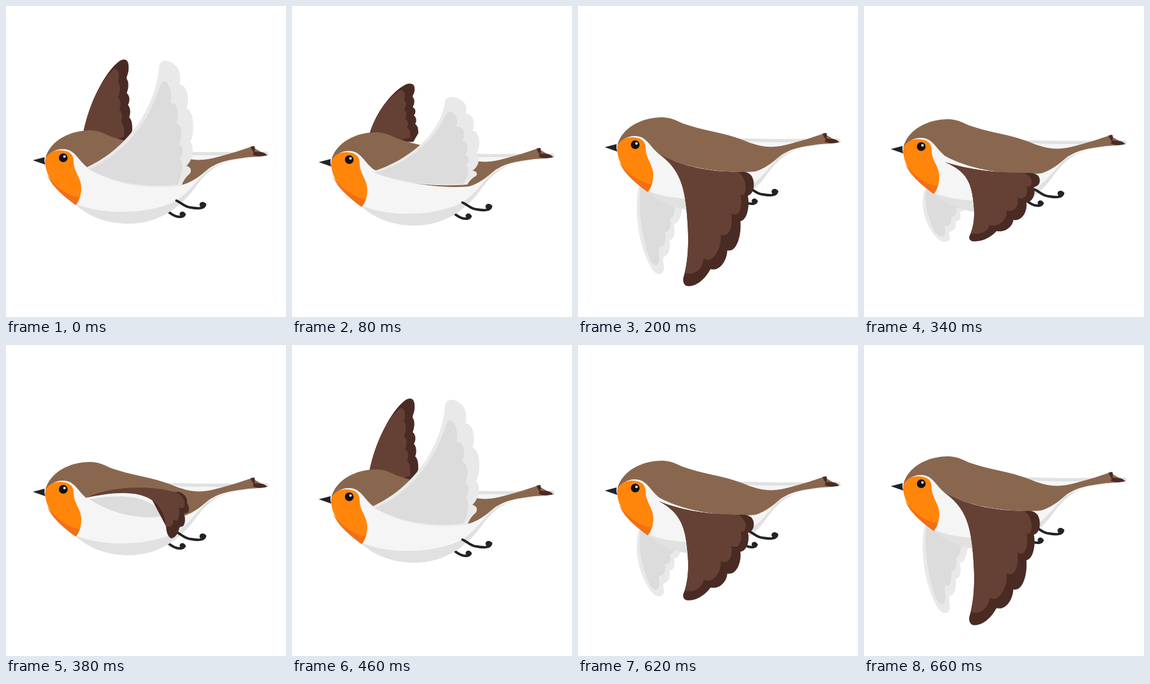
An HTML page that plays this animation: 450x500 px, repeating every 700 ms.

```html
<!DOCTYPE html>
<html lang="en">
<head>
<meta charset="utf-8">
<title>Flying robin</title>
<style>
  html, body { margin: 0; width: 100%; height: 100%; overflow: hidden; background: #fff; }
  svg { display: block; width: 450px; height: 500px; }
  .back { fill: #89674f; }
  .brown { fill: #654135; }
  .dark { fill: #4a2b24; }
  .pale { fill: #e9e9e9; }
  .grey { fill: #dcdcdc; }
  .white { fill: #f5f5f5; }
  .ink { fill: #222327; }
  .leg { fill: none; stroke: #222327; stroke-width: 4; stroke-linecap: round; }
</style>
</head>
<body>
<svg viewBox="0 0 450 500">
  <g id="bird">
    <!-- far wing -->
    <g data-pose="up" data-pivot="205">
      <path class="dark" d="M124 205C133 158 158 106 183 88C192 83 198 87 197 101C197 109 193 114 194 117C198 122 197 133 194 140C200 145 199 154 196 159C201 165 200 174 198 179C203 184 203 192 203 200L195 220H140Z"/>
      <path class="brown" d="M124 205C133 158 153 119 173 102C180 99 184 110 180 123C186 130 182 141 180 147C186 152 184 162 182 167C188 173 187 181 185 187C190 191 190 197 190 210L160 220Z"/>
    </g>
    <g data-pose="down" data-pivot="315">
      <g transform="translate(0 21)">
        <path class="pale" d="M98 287C90 325 95 380 117 420C124 433 134 435 138 424C139 416 135 409 138 403C147 402 149 385 147 376C155 377 157 361 154 350C162 351 167 336 169 310L130 285Z"/>
        <path class="grey" d="M101 290C95 325 104 378 116 408C122 420 130 420 131 406C131 399 128 393 131 387C139 390 142 374 140 363C148 364 150 350 148 341C154 341 156 331 157 312L130 285Z"/>
      </g>
    </g>

    <!-- body -->
    <path class="leg" d="M259 329Q271 340 281 339Q286 338 287 335"/>
    <ellipse class="ink" cx="283.500" cy="334.500" rx="4.500" ry="4"/>
    <path fill="#e1e1e1" d="M63 247C67 284 90 303 112 320C138 342 167 350 197 350C245 350 279 324 300 297C320 269 335 253 375 247Q400 244 423 240L420 234L320 235L100 230Z"/>
    <path class="white" d="M63 247C70 285 92 304 112 318C160 338 228 333 265 317C289 306 302 286 320 267C337 252 365 249 423 240L300 240L110 231Q70 222 63 247Z"/>
    <path class="back" d="M63 246C70 215 106 199 137 200C151 201 158 205 169 210C200 221 236 225 264 236C297 250 315 250 343 242Q370 235 395 226L419 240Q405 243 390 243C359 247 342 250 325 262C311 274 299 283 285 287C240 291 173 283 130 259C116 247 112 235 99 231C84 227 69 235 63 246Z"/>
    <path class="dark" d="M393 226L399 225Q401 229 399 234C405 235 414 233 420 240Q406 244 396 239Q400 237 395 231Z"/>
    <path fill="#ff850b" d="M63 247C68 234 82 230 95 233C108 236 109 244 109 255C111 268 121 278 121 292C121 307 116 316 112 320C91 305 61 278 63 247Z"/>
    <path fill="#f26f16" d="M66 271C77 289 98 304 118 308Q115 317 112 320C93 306 74 291 66 271Z"/>
    <path class="ink" d="M43 248L62 243Q61 249 63 255Z"/>
    <circle cx="92" cy="244" r="7" fill="#111"/>
    <circle cx="94" cy="242" r="2" fill="#fff"/>
    <path class="leg" d="M274 313C282 316 286 323 297 324C309 326 319 326 320 319"/>
    <ellipse class="ink" cx="316" cy="319.500" rx="5" ry="4.500"/>

    <!-- near wing -->
    <g data-pose="up" data-pivot="272">
      <path class="pale" d="M128 260C184 236 239 175 246 98C247 86 258 86 268 92C279 98 282 113 279 126C291 127 296 148 290 165C303 168 304 205 296 219C304 226 300 249 290 257Q300 260 296 269Q286 277 282 289C230 295 176 289 128 260Z"/>
      <path class="grey" d="M134 262C184 241 227 193 246 133C251 118 257 116 264 134Q267 146 264 156C277 155 279 175 274 188C284 192 284 211 278 222C287 226 285 239 279 246C287 253 283 269 276 287C229 292 176 287 134 262Z"/>
    </g>
    <g data-pose="fold">
      <g transform="translate(0 -9)">
        <path class="brown" d="M130 267C170 290 235 297 288 291C267 306 227 311 180 304Q159 300 130 267Z"/>
        <path class="pale" d="M160 298C188 310 228 311 257 300C280 291 286 279 287 265C289 257 297 259 296 268C297 292 275 310 250 317C218 324 184 321 160 298Z"/>
        <path class="grey" d="M165 301C200 311 243 309 266 298Q284 288 291 269C296 285 279 301 260 304C224 310 193 308 165 301Z"/>
      </g>
    </g>
    <g data-pose="down" data-pivot="284">
      <g transform="translate(0 21)">
        <path class="dark" d="M130 238C159 258 170 284 174 324C178 364 179 397 171 431C168 439 168 447 174 450C190 453 205 438 213 423C228 427 239 410 240 393C256 397 263 366 261 346C273 344 276 319 273 305C284 302 285 283 279 273Q272 265 260 267C214 267 169 259 130 238Z"/>
        <path class="brown" d="M130 238C159 258 170 284 174 324C178 364 179 397 172 429C186 434 200 424 202 406C216 416 232 389 229 367C244 375 250 350 246 333C260 343 265 319 261 303C272 309 274 277 257 267C214 267 169 259 130 238Z"/>
      </g>
    </g>
    <g data-pose="arch">
      <g transform="translate(0 12)">
        <path class="white" d="M126 246C155 234 210 229 236 246Q255 260 258 297Q190 292 126 246Z"/>
        <path class="grey" d="M133 247C176 241 232 238 253 275C219 281 170 273 133 247Z"/>
        <path class="white" d="M127 246C170 231 210 236 228 247L218 245C192 242 164 242 134 248Z"/>
        <path class="dark" d="M230 240L278 236Q292 241 291 254Q297 263 292 270L286 271Q290 283 285 291L279 293Q275 310 265 311Q258 307 257 291Z"/>
        <path class="brown" d="M127 246C162 228 230 224 269 236C285 240 289 252 286 261Q281 264 278 260Q280 275 275 283L269 280Q270 289 264 292H257C255 262 238 247 215 241C189 235 160 239 127 246Z"/>
      </g>
    </g>
  </g>
</svg>
<script>
  // [start ms, wing pose, wing spread, body offset]
  const steps = [
    [0, "up", 1, 0], [80, "up", .7, 3], [120, "up", .35, 6], [160, "fold", 1, 9],
    [200, "down", 1, -21], [340, "down", .6, -18], [380, "arch", 1, -12], [420, "up", .55, -6],
    [460, "up", 1, 0], [500, "up", .5, 5], [540, "fold", 1, 9],
    [580, "down", .35, -3], [620, "down", .75, -14], [660, "down", 1, -21]
  ];
  const bird = document.getElementById("bird");
  const wings = document.querySelectorAll("[data-pose]");

  function draw() {
    const time = performance.now() % 700;
    const [, pose, spread, dy] = steps.findLast(step => step[0] <= time);
    bird.setAttribute("transform", `translate(0 ${dy})`);
    for (const wing of wings) {
      const pivot = wing.dataset.pivot || 0;
      wing.style.display = wing.dataset.pose === pose ? "" : "none";
      wing.setAttribute("transform", `translate(0 ${pivot * (1 - spread)}) scale(1 ${spread})`);
    }
    requestAnimationFrame(draw);
  }
  draw();
</script>
</body>
</html>
```
